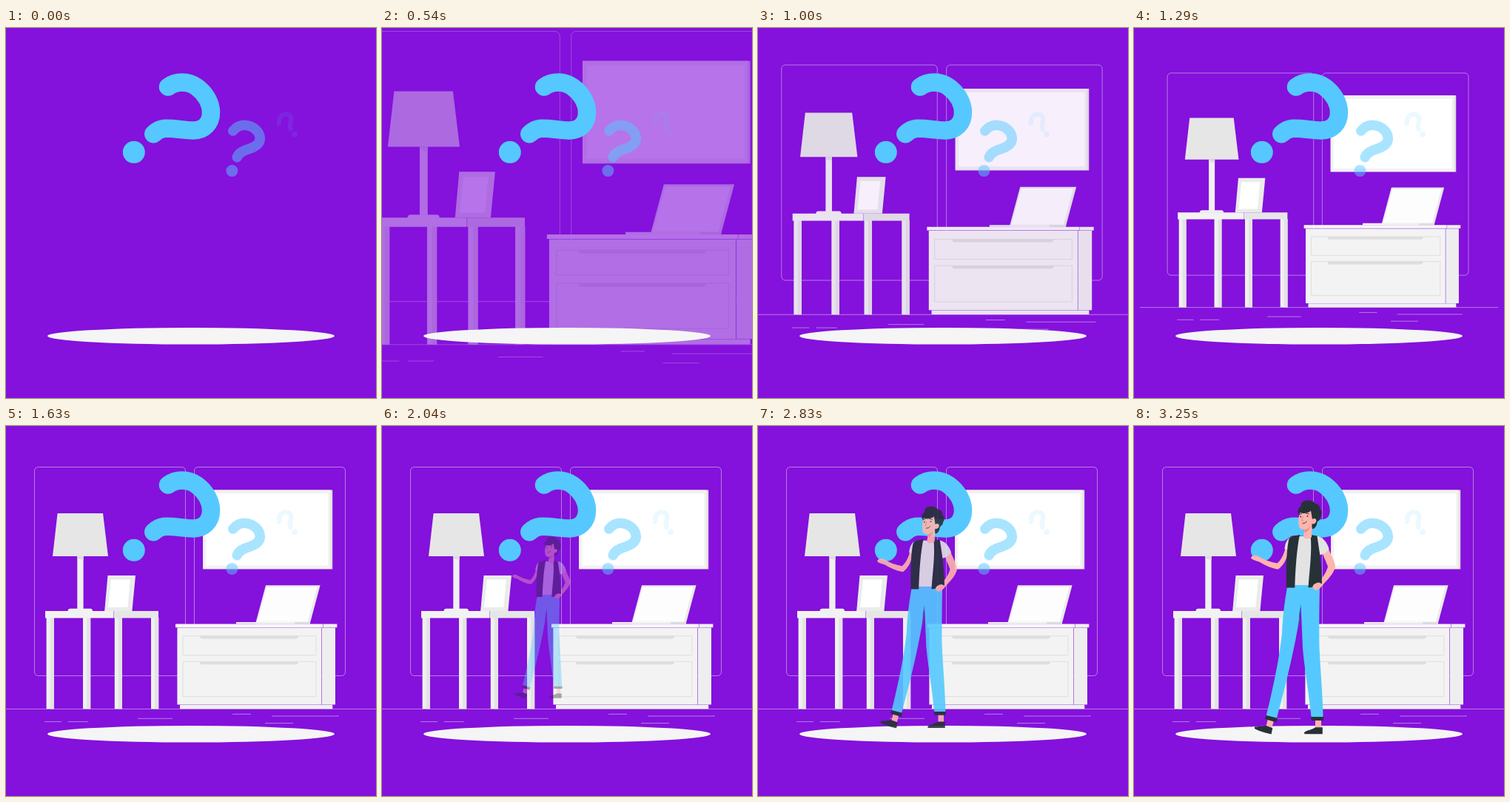
Recreate the animation shown at these times as an HTML page. Size 500 by 500 pixels, loop 3.29 s.

```html
<!DOCTYPE html>
<html lang="en">
<head>
<meta charset="utf-8">
<title>Questions</title>
<style>
  html, body { margin: 0; width: 100%; height: 100%; overflow: hidden; background: #8411dc; }
  svg { display: block; width: 100%; height: 100%; }
</style>
</head>
<body>
<svg viewBox="0 0 500 500">
  <g id="room" opacity="0">
    <g fill="none" stroke="#ebebeb" stroke-width=".5">
      <rect x="38.5" y="55.5" width="204" height="282" rx="5"/>
      <rect x="254.5" y="55.5" width="204" height="282" rx="5"/>
      <path d="M0 382.4H500M52 399.6H75M84 399.6H111M178 395.3H225M306 389.4H331M359 392H450M350 401.6H388"/>
    </g>

    <!-- board -->
    <path fill="#e0e0e0" d="M266.2 86.5H441.2V193.5H266.2z"/>
    <path fill="#f2f2f2" d="M266.2 86.5H438.6V192.8H266.2z"/>
    <path fill="#fff" d="M270.4 91.4H435.3V188.4H270.4z"/>

    <!-- lamp -->
    <path fill="#f0f0f0" d="M96.3 176H104.6V248H96.3z"/>
    <path fill="#dcdcdc" d="M96.3 176H104.6V181L97 179z"/>
    <path fill="#e6e6e6" d="M69.6 118H131L138 176H63z"/>
    <path fill="#f0f0f0" d="M83.5 250.5Q83.5 246.8 87 246.8H114Q117 246.8 117 250.5z"/>

    <!-- picture frame -->
    <path fill="#ebebeb" d="M137.5 202H175L170.4 250H133.2z"/>
    <path fill="#fff" d="M141.9 207.4H167.8L164.4 244.9H138z"/>

    <!-- table -->
    <g id="legs"></g>
    <path fill="#f2f2f2" d="M53 250H145.4V259.5H53z"/>
    <path fill="#e6e6e6" d="M145.7 250H206V259.5H145.7z"/>

    <!-- chest -->
    <path fill="#f0f0f0" d="M235 376.8H441.3V382.2H235z"/>
    <path fill="#f3f3f3" d="M231.4 272.6H426.3V376.5H231.4z"/>
    <path fill="#eee" d="M426.8 272.6H445V376.5H426.8z"/>
    <path fill="#f7f7f7" d="M229 267.5H428.2V272.2H229z"/>
    <path fill="#f0f0f0" d="M428.6 267.5H447.4V272.2H428.6z"/>
    <g fill="none" stroke="#dedede" stroke-width="1">
      <path d="M239.1 283.8H419V309.8H239.1zM239.1 318.4H419V365.7H239.1z"/>
    </g>
    <path fill="#dedede" d="M262 283.6H395Q395 287.6 392 287.6H265Q262 287.6 262 283.6zM262 318.3H395Q395 322.3 392 322.3H265Q262 322.3 262 318.3z"/>

    <!-- laptop -->
    <path fill="#e9e9e9" d="M351 215.2H424.6L410.6 267.5H337z"/>
    <path fill="#fdfdfd" d="M352.6 217.4H420.6L408 264.6H339.4z"/>
    <path fill="#f3f3f3" d="M311 265H390V267.6H311z"/>
    <path fill="#e0e0e0" d="M389.5 265H411V267.6H389.5z"/>
  </g>

  <ellipse cx="250" cy="416.3" rx="194" ry="11.3" fill="#f5f5f5"/>

  <g fill="none" stroke="#55c9ff" stroke-linecap="round">
    <path stroke-width="24.5" d="M219 79.6C230 71.5 246 71.5 258 80C269 88 277 101 277 114C277 129 267 138.5 253 138.5C240 138.5 226 135 213 136C206 137 203 140 199.3 143.2"/>
    <path stroke-width="13.6" opacity=".5" d="M306.8 139C313 131.500 320 130.500 326 131.700C336 133.500 343 141 343.3 149C343.500 157 336 161 328 163.500C320 166 315 168.500 312.2 174.600"/>
    <path stroke-width="6.4" opacity=".11" d="M369 129C368 121 373 116.500 378 116.500C385 116.500 386.500 122 384.700 127C383.500 130 383.500 133 384.600 136.500"/>
  </g>
  <g fill="#55c9ff">
    <circle cx="172.8" cy="167.800" r="15"/>
    <circle cx="305.400" cy="193" r="8" opacity=".5"/>
    <circle cx="390" cy="143.600" r="4" opacity=".11"/>
  </g>

  <g id="person" opacity="0">
    <!-- feet -->
    <g fill="#ffb4ad">
      <path d="M181 396L189 398L186 409L178 407z"/>
      <path d="M245 396H253L253 410H245z"/>
    </g>
    <g fill="#263238">
      <path d="M163 406.500C168 406 174 406 178 404.800L187.300 408.300L185.500 416.500C178 415 168 412 163 409z"/>
      <path d="M230 414C234 411 241 410.500 245 407.300H254.800V416.300H230.500z"/>
      <path d="M178.500 390.500L194 394.500L192.500 400.500L177 396z"/>
      <path d="M239 392.500H256.300L255.700 398H240z"/>
    </g>

    <!-- trousers -->
    <path fill="#55c9ff" d="M207.500 215H251C250.500 240 250 270 250.500 300C252 330 255 365 255.500 393H239.500C237 365 230 325 228 300L225.500 241C223 275 208 340 193 394.500L178.800 391C189 350 197 310 200 280C201 255 204 235 207.500 215z"/>
    <path fill="#2b6f94" d="M225.600 241L222.300 276L223.200 253z"/>

    <!-- arms -->
    <g fill="#ffb4ad">
      <path d="M205 163C203 173 199 181 193.500 185.500C184 183.500 176 181 169 176.500C164 173.500 158 175 158.200 178.500C160 181.500 166 182 170 184C178 189 188 193 195 193.500C203 188 207 178 209 168z"/>
      <path d="M255 172L263 166C267 176 271.800 184 272 190C270 200 261 208 255 215C251 220 247 222.500 243.500 221C240 217 244 212.500 249 212C254 206 260 198 262 190C260 184 257 179 255 172z"/>
    </g>

    <!-- clothes -->
    <g fill="#e3e3e3">
      <path d="M221 149L243 149L240 215H216z"/>
      <path d="M213 149C207 152 204 159 203.500 166L211 170z"/>
      <path d="M246 148.500C256 150 261 158 263.500 166C261 171 256 174 251 174z"/>
    </g>
    <g fill="#263238">
      <path d="M212 149.500L224 147C220 165 218 195 217.300 218.500H206C205.500 195 206 170 208.500 157C209 153 210 151 212 149.500z"/>
      <path d="M238.500 147L247.500 148.500C249 160 254 185 254 214C248 216.500 240 218 235.500 218.500C237 195 241 170 238.500 147z"/>
    </g>

    <!-- hand on hip -->
    <path fill="#ffb4ad" d="M250 211.500C244 212 240 216 242 219L246 222C250 221 253 217 255.500 214z"/>

    <!-- head -->
    <path fill="#263238" d="M222.500 119C220.500 115 222 110 225.500 109C225 104 229 100 234 100.500C240 100 244 103 245 105C250 105.500 251.500 109 251 112C255 115 254 120 252 123C252 127 249 128 247.500 130C247 135 245 138 241.500 139.500L235 126z"/>
    <path fill="#ffb4ad" d="M224.500 117C229 119 236 118 239 114.500L241 126C244 123.500 247.500 126 246 129.500C245 132 242 133 240.500 132L240 150C237 153.500 231 153 229 150.500L230.500 140C227 140.500 224 139 223 136C221.500 130 222 123 224.500 117z"/>
    <path fill="#f08d88" d="M230.500 140C234 139.500 236 138 238 135.500C237 140 234 143.500 230.200 144z"/>
    <g fill="#263238">
      <circle cx="225.300" cy="122.500" r=".9"/>
      <circle cx="234.500" cy="122" r=".9"/>
    </g>
    <path fill="none" stroke="#263238" stroke-width=".9" stroke-linecap="round" d="M223.500 119.500L226.500 118.500M232.500 118L236.500 119M228 131.500Q231.500 132 233.500 129"/>
    <path fill="none" stroke="#ee7f79" stroke-width=".9" d="M228.500 122L226.800 127.500H229"/>
  </g>
</svg>
<script>
const LOOP = 3290, FRAMES = 79, HALF = LOOP / 2;
const room = document.getElementById('room');
const person = document.getElementById('person');

document.getElementById('legs').innerHTML = [54.6, 104, 146.8, 196].map(x =>
  `<path fill="#f0f0f0" d="M${x} 259H${x + 10.2}V382.300H${x}z"/>
   <path fill="#e3e3e3" d="M${x + 5.200} 259H${x + 10.2}V382.300H${x + 5.200}z"/>`).join('');

function bezier(x1, y1, x2, y2) {
  const at = (a, b, u) => 3 * (1 - u) ** 2 * u * a + 3 * (1 - u) * u * u * b + u ** 3;
  return x => {
    if (x <= 0) return 0;
    if (x >= 1) return 1;
    let lo = 0, hi = 1;
    for (let i = 0; i < 30; i++) {
      const mid = (lo + hi) / 2;
      if (at(x1, x2, mid) < x) lo = mid; else hi = mid;
    }
    return at(y1, y2, lo);
  };
}

const overshoot = bezier(.36, -.01, .5, 1.38);
const easeOut = bezier(0, 0, .58, 1);

function zoom(el, cx, cy, from, p) {
  const scale = from + (1 - from) * p;
  el.setAttribute('transform', `translate(${cx} ${cy}) scale(${scale}) translate(${-cx} ${-cy})`);
  el.setAttribute('opacity', Math.max(0, Math.min(1, p)));
}

function draw(ms) {
  // the motion runs in steps at 24 frames per second
  const step = LOOP / FRAMES;
  const t = (Math.floor((ms % LOOP + 8) / step) % FRAMES + .5) * step;
  zoom(room, 250, 228.5, 1.5, overshoot(t / HALF));
  zoom(person, 215.5, 259, .5, easeOut((t - HALF) / HALF));
}

const start = performance.now();
function tick() {
  draw(performance.now() - start);
  requestAnimationFrame(tick);
}
tick();
</script>
</body>
</html>
```
